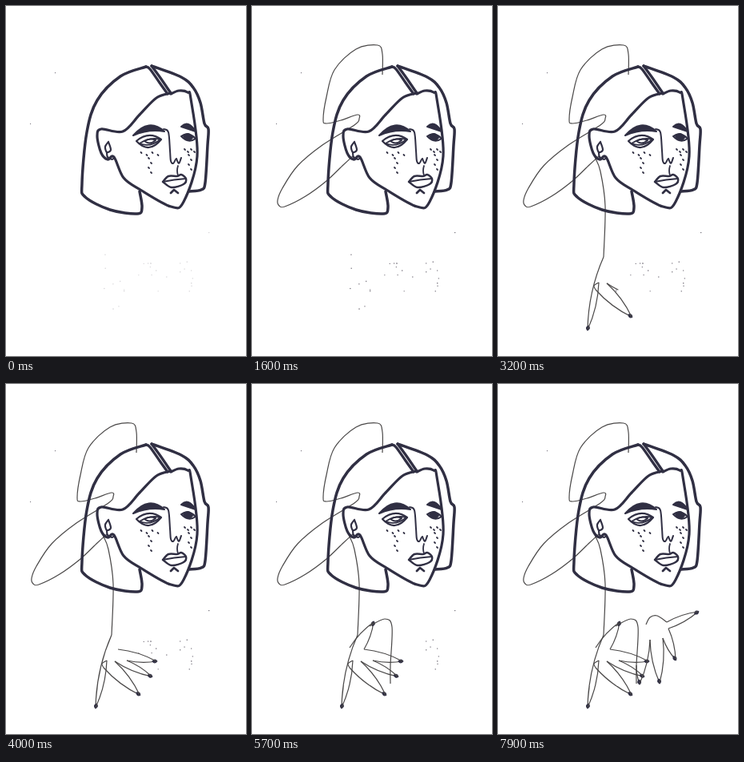
Recreate the animation shown at these times as an HTML page. Size 300 px wide and 438 px high, loop 8 s.

```html
<!DOCTYPE html>
<html lang="en">
<head>
<meta charset="utf-8">
<title>Line portrait</title>
<style>
  html, body { margin: 0; width: 100%; height: 100%; overflow: hidden; background: #fff; }
  svg { display: block; width: 100vw; height: 100vh; }
  path { fill: none; stroke-linejoin: round; }
  #face path { stroke: #302f43; stroke-linecap: round; }
  #face .solid { fill: #302f43; }
  #pen path { stroke: #4a4848; stroke-width: 1.2; }
  #pen .nail { fill: #302f43; stroke: #302f43; stroke-width: 1; }
  #specks rect { fill: #77737d; }
</style>
</head>
<body>
<svg viewBox="0 0 300 438" xmlns="http://www.w3.org/2000/svg">
  <g id="specks"></g>
  <g id="pen"></g>
  <g id="face"></g>
</svg>
<script>
const LOOP = 8000, STEP = 100;

function add(parent, tag, attrs) {
  const el = document.createElementNS('http://www.w3.org/2000/svg', tag);
  for (const key in attrs) el.setAttribute(key, attrs[key]);
  return document.getElementById(parent).appendChild(el);
}

const parse = text => text.split(' ').map(s => s.split(',').map(Number));

// Smooth curve through "x,y x,y ..."
function curve(text) {
  const p = parse(text);
  let d = 'M' + p[0];
  for (let i = 0; i < p.length - 1; i++) {
    const a = p[i - 1] || p[i], b = p[i], c = p[i + 1], e = p[i + 2] || c;
    const c1 = b.map((v, k) => v + (c[k] - a[k]) / 6);
    const c2 = c.map((v, k) => v - (e[k] - b[k]) / 6);
    d += `C${c1} ${c2} ${c}`;
  }
  return d;
}

const ink = (width, d, cls = '') => add('face', 'path', { d, 'stroke-width': width, class: cls });

// Closed shape between two corners; rise and drop are the heights of its edges
function lens(x1, y1, x2, y2, rise, drop) {
  const x = (x1 + x2) / 2, y = (y1 + y2) / 2;
  return `M${x1} ${y1}Q${x} ${y - 2 * rise} ${x2} ${y2}Q${x} ${y + 2 * drop} ${x1} ${y1}Z`;
}

// Hair, parting, hairline and jaw
ink(3.5, curve('175,76 143,88 114,118 101,158 95,222 99,239 130,255 164,260 170,252 167,232'));
ink(3.3, curve('175,76 180,79 192,96 202,110'));
ink(3.3, curve('182,75 193,90 206,109'));
ink(3.5, curve('182,75 219,89 234,102 243,121 248,147 253,154 252,174 249,221 244,230 229,232'));
ink(3.2, curve('206,109 188,115 167,136 146,157 119,154 114,163 119,184 127,192 135,189 147,215 168,230 206,251 222,245 239,188 231,116 227,108 216,106 206,110'));

// Ear
ink(2.2, curve('128,170 124,176 126,183 131,180 128,170'));
ink(2.2, curve('126,183 127,189 133,192 135,189'));

// Brows and eyes
ink(2, lens(159, 162, 198, 157, 10, -3), 'solid');
ink(2, lens(219, 151, 237, 157, 6, 0), 'solid');
ink(2.2, lens(163, 169, 194, 167, 6, 9));
ink(1.8, lens(167, 172, 193, 167, 3, 4));
ink(2, lens(173, 169, 187, 168, 2, 3));
ink(2, lens(219, 163, 237, 166, 4, 4));
ink(2, lens(222, 163, 233, 165, 4, 4), 'solid');

// Nose, mouth and chin
ink(2, curve('197,154 203,158 205,181 206,194 209,197 212,192'));
ink(2, curve('213,191 216,197 219,190'));
ink(1.8, 'M215 200Q213 206 215 212');
ink(2.5, curve('196,220 203,213 214,213 219,211 225,216 222,223 207,227 196,220'));
ink(1.9, 'M196 220Q210 217 225 216');
ink(2.8, 'M206 234L210 230L215 234');

// Freckles: a row under each eye, then a column going down
function freckles(x, y, across) {
  const dot = (dx, dy) => ink(1.8, `M${x + dx} ${y + dy}l1 1`);
  for (let i = 0; i < 4; i++) {
    dot((i - 1.5) * across, i % 2 * 3);
    dot(i % 2 * 3 - 1, 7 + i * 6);
  }
}
freckles(179, 183, 7);
freckles(229, 179, 4);

// Pen parts: each is { d } with an optional nail at its end
const sweep = text => [{ d: curve(text) }];

// Hand outline through knuckle, fingertip, knuckle, fingertip ...
function fingers(text) {
  const p = parse(text);
  return p.slice(1).map(([x, y], i) => {
    const [px, py] = p[i], dx = x - px, dy = y - py;
    const bend = `${(px + x) / 2 - dy * .1} ${(py + y) / 2 + dx * .1}`;
    return {
      d: `M${px} ${py}Q${bend} ${x} ${y}`,
      nail: i % 2 === 0 && `translate(${x} ${y}) rotate(${Math.atan2(dy, dx) * 180 / Math.PI})`
    };
  });
}

// Within a stage the pen moves at constant speed
function stage(from, to, parts) {
  let total = 0;
  for (const part of parts) {
    part.el = add('pen', 'path', { d: part.d });
    part.start = total;
    part.length = part.el.getTotalLength();
    total += part.length;
    if (part.nail) part.tip = add('pen', 'path', { class: 'nail', d: lens(-5, 0, 1, 0, 2, 2), transform: part.nail });
  }
  return { from, to, parts, total };
}

const stages = [
  stage(0, 2500, [
    ...sweep('163,86 163,60 157,49 130,54 103,80 93,114 89,142 93,147 111,143 132,136 134,141 128,149 88,174 57,200 38,228 32,243 34,250 41,251 67,238 93,219 114,199 126,188'),
    ...sweep('121,189 128,207 134,250 132,314'),
    ...fingers('132,314 112,405 126,346')
  ]),
  stage(2500, 4000, [
    ...sweep('126,346 120,350 122,355'),
    ...fingers('122,355 167,389 136,347 182,366 151,346 188,347 140,332')
  ]),
  stage(4000, 5700, [
    ...fingers('140,332 152,298 122,330'),
    ...sweep('147,303 166,294 175,304 173,352 173,375')
  ]),
  stage(5700, 7900, [
    ...fingers('173,352 177,375 190,320 202,374 206,318 222,345 213,306 250,285 211,298'),
    ...sweep('211,298 199,290 190,292 185,301')
  ])
];

// Seeded paper specks, wiped away from left to right
let seed = 11;
const random = () => (seed = seed * 16807 % 2147483647) / 2147483647;
const speck = (x, y, until) => ({
  until, el: add('specks', 'rect', { x, y, width: 1 + random() * .4, height: 1 + random() * .4 })
});
const wipeTime = x => 4000 + (x - 165) * 42;

speck(61, 83, LOOP);
speck(30, 147, LOOP);
ink(2.5, 'M125 103h1');
const specks = [speck(253, 283, wipeTime(253))];
for (let i = 0; i < 28; i++) {
  const x = 122 + random() * 115;
  const y = 338 + (random() - .5) * (90 - (x - 122) * .5);
  specks.push(speck(x, y, wipeTime(x)));
}

function draw(t) {
  for (const { from, to, parts, total } of stages) {
    const reach = Math.min(1, (t - from) / (to - from)) * total;
    for (const { el, tip, start, length } of parts) {
      const shown = Math.min(length, reach - start);
      el.style.display = shown > 0 ? '' : 'none';
      el.setAttribute('stroke-dasharray', shown < length ? `${Math.max(0, shown)} ${length + 1}` : 'none');
      if (tip) tip.style.display = shown >= length ? '' : 'none';
    }
  }
  for (const { until, el } of specks) {
    el.style.display = t < until ? '' : 'none';
    el.style.opacity = t < STEP ? .3 : 1;
  }
}

const begin = performance.now();
function tick() {
  const t = (performance.now() - begin) % LOOP;
  draw(Math.floor(t / STEP) * STEP);
  requestAnimationFrame(tick);
}
tick();
</script>
</body>
</html>
```
